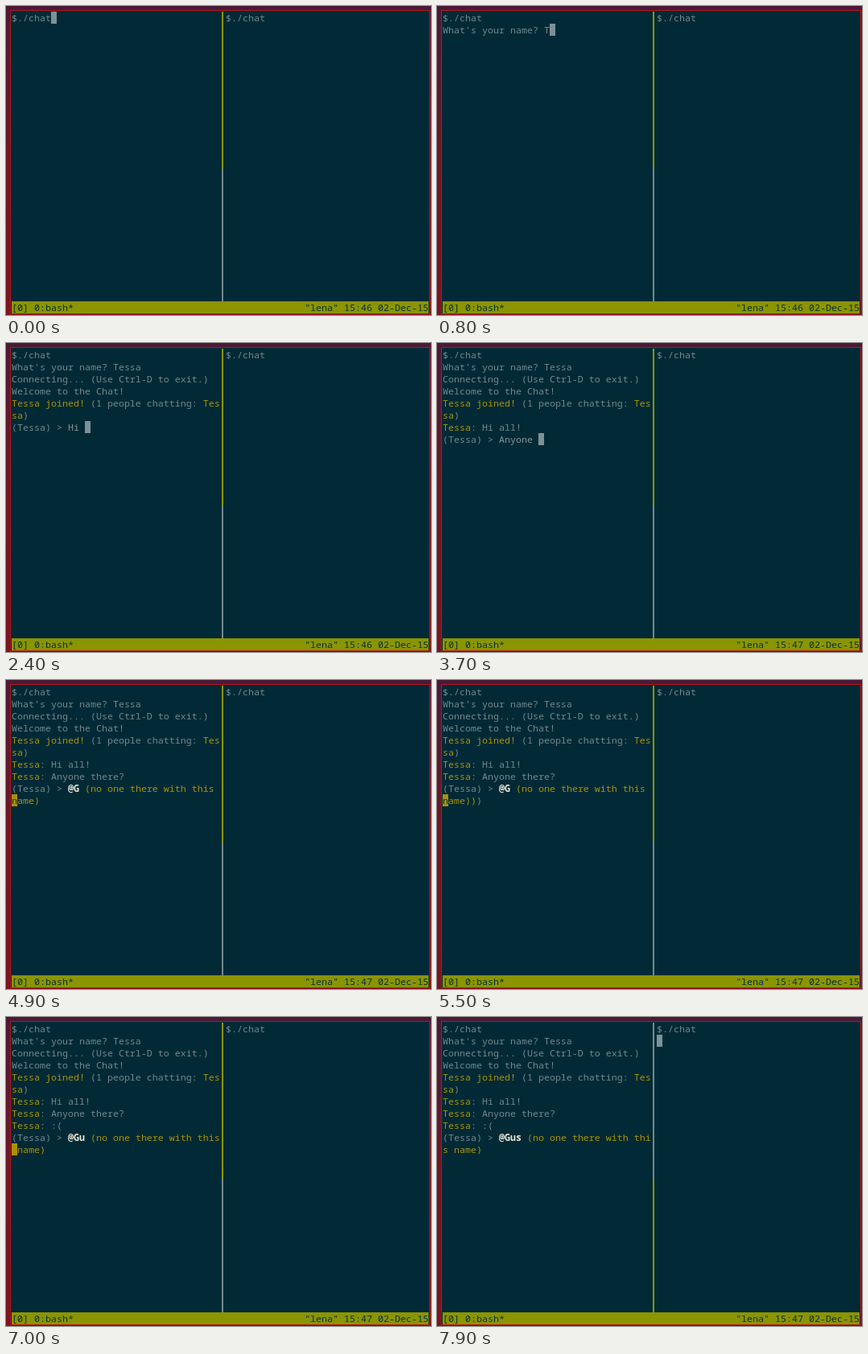
An HTML page that plays this animation: 528x384 px, repeating every 8 s.

```html
<!DOCTYPE html>
<html lang="en">
<head>
<meta charset="utf-8">
<title>Terminal chat</title>
<style>
  html, body { margin: 0; width: 100%; height: 100%; overflow: hidden; }
  body {
    position: relative;
    background: linear-gradient(#4a1a36, #6a1828 45%, #7c1420);
    font: 11.667px/15px "Noto Sans Mono", "DejaVu Sans Mono", monospace;
    color: #70898e;
  }
  body * { position: absolute; white-space: pre; }
  .pane span { position: static; }
  #term {
    left: 5px; top: 5px; width: 520px; height: 376px;
    border: 1px solid #b8141c; background: #022a36;
  }
  .pane { top: 7px; width: 259px; height: 360px; }
  #left { left: 7px; }
  #right { left: 273px; }
  .line { left: 0; height: 15px; }
  .rule { left: 268px; width: 2px; background: #708a8e; }
  .rule.on { background: #879600; }
  #upper { top: 7px; height: 195px; }
  #lower { top: 202px; height: 165px; }
  #status {
    left: 7px; top: 367px; width: 518px; height: 15px;
    background: #8a9500; color: #07303a;
  }
  #clock { right: 0; }
  #cursor { width: 7px; height: 15px; background: #7d9194; color: #022a36; }
  #cursor.name { background: #a8920a; }
  .name { color: #a8920a; }
  .input { color: #839698; }
  .to { color: #eee8d5; font-weight: bold; }
</style>
</head>
<body>
<div id="term"></div>
<div id="left" class="pane"></div>
<div id="right" class="pane"><div class="line">$./chat</div></div>
<div id="upper" class="rule"></div>
<div id="lower" class="rule"></div>
<div id="status"><span>[0] 0:bash*</span><span id="clock"></span></div>
<div id="cursor"></div>
<script>
const LOOP = 8000, STEP = 100, COLS = 37, CELL = 7, ROW = 15;
const USER = "Tessa", FRIEND = "@Gus";
const HINT = " (no one there with this name)";
const $ = id => document.getElementById(id);

// Part of the text typed by time t, one key per step.
const typed = (text, t, start, step = 100) =>
  text.slice(0, Math.max(0, Math.floor((t - start) / step) + 1));

// Splits styled runs into rows of styled cells.
function wrap(runs) {
  const cells = runs.flatMap(([text, style = ""]) =>
    [...text].map(ch => ({ ch, style })));
  const rows = [];
  for (let i = 0; i < cells.length; i += COLS) rows.push(cells.slice(i, i + COLS));
  return rows.length ? rows : [[]];
}

const said = text => [[USER, "name"], [": " + text]];

// Current input after the prompt, as [text, leftover cells].
function entry(t) {
  if (t < 2900) return typed("Hi all!", t, 2100, t < 2400 ? 150 : 120);
  if (t < 4500) return typed("Anyone there?", t, 3100);
  if (t < 5400) return typed(FRIEND, t, 4800);
  if (t < 5800) return FRIEND.slice(0, 3 - Math.floor((t - 5400) / 100));
  if (t < 6500) return typed(":(", t, 6000, 200);
  return typed(FRIEND, t, 6800);
}

function screen(t) {
  const rows = [];
  const add = (...runs) => rows.push(...wrap(runs));
  const end = () => ({ row: rows.length - 1, col: rows.at(-1).length });

  add(["$./chat"]);
  if (t < 200) return { rows, at: end() };
  if (t < 300) return { rows, at: { row: 1, col: 0 } };
  add(["What's your name? " + typed(USER, t, 800)]);
  if (t < 1500) return { rows, at: end() };
  if (t < 1700) return { rows, at: { row: 2, col: 0 } };
  add(["Connecting... (Use Ctrl-D to exit.)"]);
  if (t < 1900) return { rows, at: { row: 3, col: 0 } };
  add(["Welcome to the Chat!"]);
  add([USER + " joined!", "name"], [" (1 people chatting: "], [USER, "name"], [")"]);
  if (t >= 2900) add(...said("Hi all!"));
  if (t >= 4500) add(...said("Anyone there?"));
  if (t >= 6500) add(...said(":("));

  const text = entry(t), prompt = [`(${USER}) > `];
  if (text[0] === "@") {
    add(prompt, [text, "to"], [HINT, "name"]);
    // Deleting keys leaves the ends of longer hints behind.
    if (t >= 5400 && t < 5800) add_tail(rows.at(-1));
    return { rows, at: { row: rows.length - 1, col: 0 } };
  }
  add(prompt, [text, "input"]);
  const at = end();
  if (t >= 5700 && t < 6500) add(["ame)))", "name"], [")"]);
  return { rows, at };
}

function add_tail(row) {
  while (row.length < 7) row.push({ ch: ")", style: row.length < 6 ? "name" : "" });
}

function drawRow(cells, i) {
  const line = document.createElement("div");
  line.className = "line";
  line.style.top = i * ROW + "px";
  let span = null;
  for (const { ch, style } of cells) {
    if (!span || span.className !== style) {
      span = document.createElement("span");
      span.className = style;
      line.append(span);
    }
    span.textContent += ch;
  }
  return line;
}

function draw(t) {
  const { rows, at } = screen(t);
  $("left").replaceChildren(...rows.map(drawRow));

  const switched = t >= 7700;
  $("upper").classList.toggle("on", !switched);
  $("lower").classList.toggle("on", switched);
  $("clock").textContent = `"lena" 15:${t < 3000 ? 46 : 47} 02-Dec-15`;

  const spot = !switched ? at : t < 7900 ? { row: 0, col: 7 } : { row: 1, col: 0 };
  const under = switched ? null : rows[spot.row]?.[spot.col];
  const cursor = $("cursor");
  cursor.style.left = (switched ? 273 : 7) + spot.col * CELL + "px";
  cursor.style.top = 7 + spot.row * ROW + "px";
  cursor.textContent = under ? under.ch : "";
  cursor.className = under ? under.style : "";
}

let shown = -1;
function tick() {
  const t = Math.floor(performance.now() % LOOP / STEP) * STEP;
  if (t !== shown) draw(shown = t);
  requestAnimationFrame(tick);
}
tick();
</script>
</body>
</html>
```
